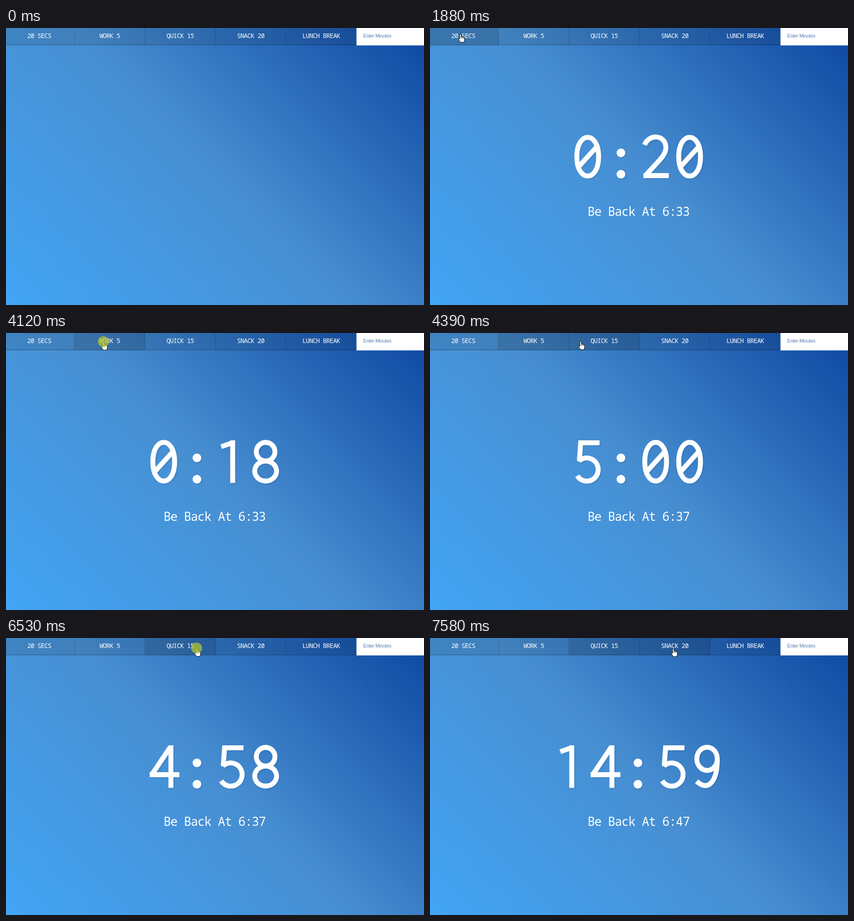
Recreate the animation shown at these times as an HTML page. Size 919 by 609 pixels, loop 8 s.

```html
<!DOCTYPE html>
<html lang="en">
<head>
<meta charset="utf-8">
<title>Countdown timer</title>
<style>
  html, body { margin: 0; width: 100%; height: 100%; overflow: hidden; }
  body { background: linear-gradient(45deg, #42a5f5 0%, #478ed1 50%, #0d47a1 100%); }
  svg { display: block; width: 919px; height: 609px; }
  text { fill: #fff; text-anchor: middle; white-space: pre; }
  .mono { font-family: "Noto Sans Mono", "DejaVu Sans Mono", monospace; }
  .label { font-size: 13.8px; letter-spacing: -.8px; }
  .back { font-size: 26.5px; letter-spacing: -.97px; }
  .plain { font-size: 124px; fill: transparent; }
  .hint { font: 10px "Liberation Sans", Arial, sans-serif; fill: #4f74ab; text-anchor: start; }
  #digits { fill: none; stroke: #fff; stroke-width: 10.8; stroke-miterlimit: 2;
    filter: drop-shadow(3px 3px 0 rgba(0, 0, 0, .05)); }
  .dots { stroke-width: 19; stroke-linecap: round; }
</style>
</head>
<body>
<svg viewBox="0 0 919 609">
  <g id="bar"></g>
  <rect x="770.5" width="149" height="38.3" fill="#fff"/>
  <text class="hint" x="785.5" y="20.5">Enter Minutes</text>
  <text id="time" class="mono plain" x="459" y="330"></text>
  <g id="digits" aria-hidden="true"></g>
  <text id="back" class="mono back" x="458.5" y="413"></text>
  <g id="cursor">
    <path fill="#fff" stroke="#000" stroke-linejoin="round" d="M-1.6 11.5V1.8a1.6 1.6 0 0 1 3.2 0V6.5a1.4 1.4 0 0 1 2.6.4a1.4 1.4 0 0 1 2.5.6a1.3 1.3 0 0 1 2.1 1V13c0 2.5-1.4 3.5-1.4 5.5H0c0-1.5-3.8-4-4.2-7.2c-.2-1.6 1.6-1.8 2.6.2z"/>
    <path fill="none" stroke="#000" stroke-width=".9" d="M1.6 6.5v3.5M4.2 7v3M6.7 7.5v2.5"/>
    <circle id="click" r="12" fill="#b4c631" opacity=".72"/>
  </g>
</svg>
<script>
const LOOP = 8000, TICK = 990, PRESS = 90;
const LABELS = ['20 SECS', 'WORK 5', 'QUICK 15', 'SNACK 20', 'LUNCH BREAK'];
const BUTTON = 155, BAR_LEFT = -4, ADVANCE = 74.67;
const NOW = 6 * 60 + 32.75; // time of day in minutes

// Pen strokes of the large digits: x from the cell centre, y from the digit top
const GLYPHS = {
  0: 'M-24 48C-24-8.7 24-8.7 24 48S-24 104.7-24 48ZM-19 69L19 27',
  1: 'M2.2 1V94.5M-23 15L0 6.8',
  2: 'M-24.5 22C-14-4 22.5 0 22.5 28C22.5 46 2 61-21 88M-27 89.5H29',
  4: 'M15.8 1V94.5M-31 65.5H34.5M-26 65L15 4',
  5: 'M26 6.3H-15.5L-18.5 46A25 25.5 0 1 1-23 79',
  8: 'M0 46.5a20.5 20.5 0 1 1 .1 0a24 22 0 1 1-.1 0',
  9: 'M23 36A22.5 25.5 0 1 1 23.5 31C23.5 78 5 105-22 80',
  ':': 'M-1.7 39.5h0M-1.7 86.5h0'
};

// Pointer legs: each eases from the end of the one before
const LEGS = [
  { from: 1150, to: 1420, x: 65, y: 13 },
  { from: 1870, to: 1880, x: 67, y: 13 },
  { from: 2600, to: 2660, x: 69, y: 13 },
  { from: 3590, to: 3980, x: 214, y: 19 },
  { from: 4230, to: 4530, x: 371, y: 18 },
  { from: 4800, to: 4920, x: 391, y: 22 },
  { from: 5190, to: 5450, x: 414, y: 22 },
  { from: 5600, to: 5710, x: 419, y: 22 },
  { from: 6590, to: 6920, x: 535, y: 22.5 }
];

const RUNS = [
  { start: 1610, secs: 20 },
  { start: 4200, secs: 300 },
  { start: 6590, secs: 900 }
];

const $ = id => document.getElementById(id);

function add(parent, tag, attrs, text = '') {
  const el = document.createElementNS('http://www.w3.org/2000/svg', tag);
  for (const key in attrs) el.setAttribute(key, attrs[key]);
  el.textContent = text;
  return parent.appendChild(el);
}

const buttons = LABELS.map((label, i) => {
  const x = BAR_LEFT + i * BUTTON;
  const face = add($('bar'), 'rect', { x, width: BUTTON, height: 38 });
  add($('bar'), 'path', { d: `M${x} 36.5h${BUTTON}V38h${-BUTTON}zM${x + BUTTON - 1} 0h1V36.5h-1z`, 'fill-opacity': .2 });
  add($('bar'), 'text', { class: 'mono label', x: x + 77, y: 21.6 }, label);
  return face;
});

const clock = n => Math.floor(n / 60) + ':' + String(Math.floor(n % 60)).padStart(2, '0');
const easeOut = p => Math.sin(Math.min(1, p) * Math.PI / 2);

function pointer(t) {
  let x = 42, y = -2;
  for (const leg of LEGS) {
    if (t < leg.from) break;
    const k = easeOut((t - leg.from) / (leg.to - leg.from));
    x += (leg.x - x) * k;
    y += (leg.y - y) * k;
  }
  return { x, y };
}

let shown = null;
function showTime(label) {
  if (label === shown) return;
  shown = label;
  $('time').textContent = label;
  $('digits').replaceChildren();
  [...label].forEach((ch, i) => {
    const x = 458.8 + (i - (label.length - 1) / 2) * ADVANCE;
    add($('digits'), 'path', {
      d: GLYPHS[ch],
      class: ch === ':' ? 'dots' : 'digit',
      transform: `translate(${x} 235)`
    });
  });
}

function draw(t) {
  const { x, y } = pointer(t);
  const visible = t >= LEGS[0].from;
  $('cursor').style.display = visible ? '' : 'none';
  $('cursor').setAttribute('transform', `translate(${x} ${y})`);

  const started = RUNS.filter(r => r.start <= t).length;
  const pressed = RUNS.filter(r => r.start - PRESS <= t).length;
  $('click').style.display = pressed > started ? '' : 'none';

  const hover = visible ? Math.floor((x - BAR_LEFT) / BUTTON) : -1;
  buttons.forEach((b, i) => b.setAttribute('fill-opacity', i === hover || i === pressed - 1 ? .2 : .1));

  const run = RUNS[started - 1];
  showTime(run ? clock(run.secs - Math.floor((t - run.start) / TICK)) : '');
  $('back').textContent = run ? 'Be Back At ' + clock(NOW + run.secs / 60) : '';
}

const begin = performance.now();
function loop() {
  draw((performance.now() - begin) % LOOP);
  requestAnimationFrame(loop);
}
loop();
</script>
</body>
</html>
```
